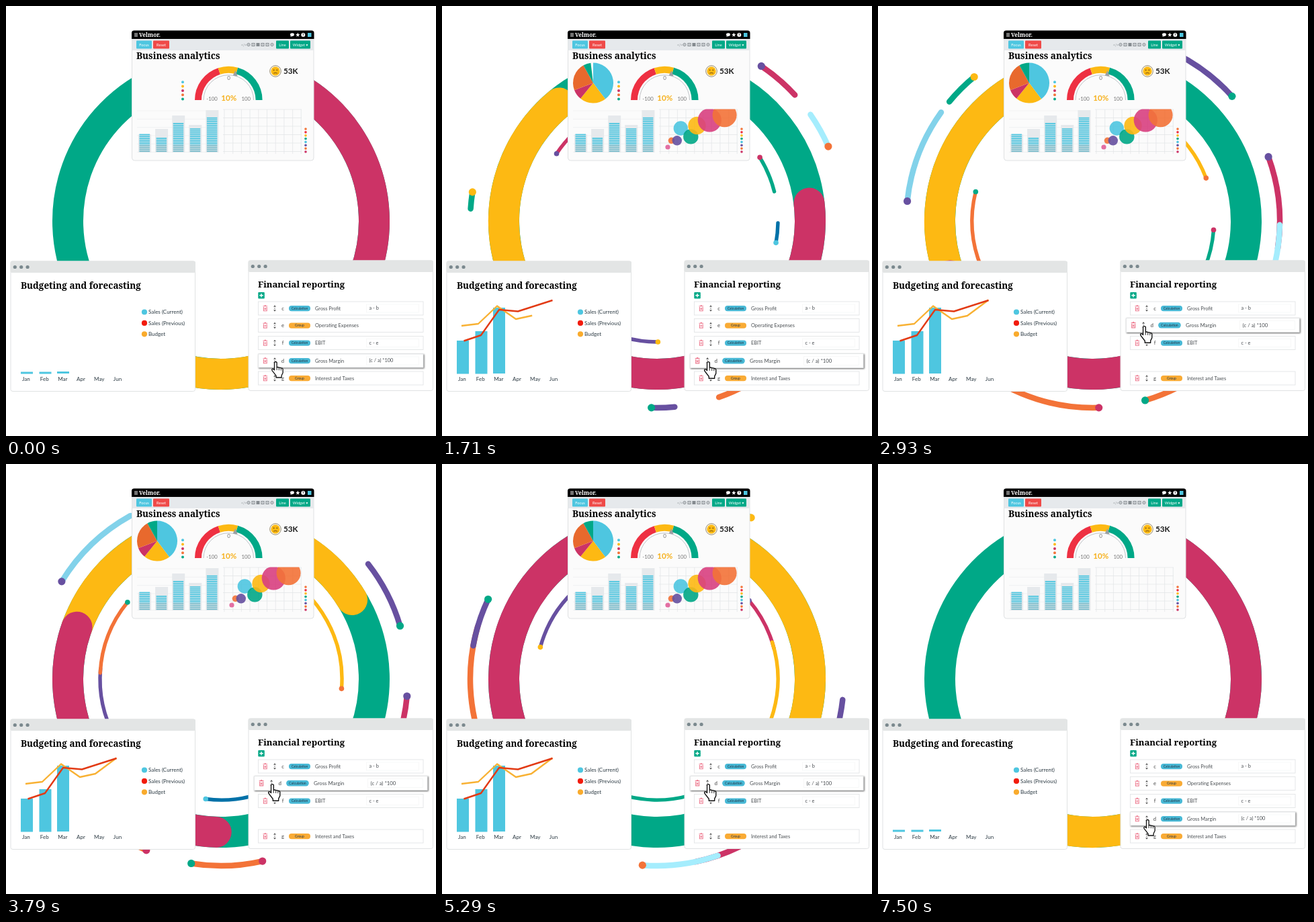
Animation of 640x640 px, one loop 7.57 s. Source, as an HTML page:

```html
<!DOCTYPE html>
<html lang="en">
<head>
<meta charset="utf-8">
<title>Planning cycle</title>
<style>
html, body { margin: 0; width: 100%; height: 100%; overflow: hidden; background: #fff; }
svg { display: block; width: 640px; height: 640px; }
text { font-family: Lato, sans-serif; }
.slab { font-family: "Noto Serif", serif; font-weight: 700; }
</style>
</head>
<body>
<svg id="stage" viewBox="0 0 640 640"></svg>
<script>
const LOOP = 7570, FPS = 14, LAST = 105;
const C = {
  green: '#00a887', pink: '#cc3366', yellow: '#fdb913', purple: '#6750a0', orange: '#f37338',
  sky: '#4ec6e0', pale: '#a5edfd', light: '#82d2ea', blue: '#0071a8', red: '#ee3042'
};
const stage = document.getElementById('stage');

// ---- drawing helpers ----
function el(tag, attrs, parent = stage) {
  const node = document.createElementNS('http://www.w3.org/2000/svg', tag);
  for (const k in attrs) node.setAttribute(k, attrs[k]);
  parent.appendChild(node);
  return node;
}
const group = (parent, attrs = {}) => el('g', attrs, parent);
const rect = (p, x, y, width, height, fill, more) => el('rect', { x, y, width, height, fill, ...more }, p);
const dot = (p, cx, cy, r, fill, more) => el('circle', { cx, cy, r, fill, ...more }, p);
const path = (p, d, stroke, width, more) =>
  el('path', { d, fill: 'none', stroke, 'stroke-width': width, ...more }, p);
const shape = (p, d, fill) => el('path', { d, fill }, p);
function label(p, x, y, str, size, fill, more) {
  const node = el('text', { x, y, 'font-size': size, fill, ...more }, p);
  node.textContent = str;
  return node;
}
const MID = { 'text-anchor': 'middle' };
const BOLD = { 'font-weight': 700 };

// angles run clockwise in degrees, 0 at the top
function polar(cx, cy, r, deg) {
  const a = deg * Math.PI / 180;
  return [cx + r * Math.sin(a), cy - r * Math.cos(a)];
}
function arc(cx, cy, r, a, b) {
  const big = b - a > 180 ? 1 : 0;
  return `M${polar(cx, cy, r, a)}A${r} ${r} 0 ${big} 1 ${polar(cx, cy, r, b)}`;
}
const ramp = (t, from, to) => Math.min(1, Math.max(0, (t - from) / (to - from)));
const ease = u => (1 - Math.cos(Math.PI * u)) / 2;

// ---- ring: yellow over green, pink over both ----
const ring = group(stage);
dot(ring, 320, 320, 228, 'none', { stroke: C.green, 'stroke-width': 46 });
path(ring, arc(320, 320, 228, 0, 129), C.yellow, 46, { 'stroke-linecap': 'round' });
path(ring, arc(320, 320, 228, -108, 0), C.pink, 46, { 'stroke-linecap': 'round' });

// ---- orbiting strokes: radius, tail angle at 3790 ms, length, colour, tail dot, head dot, delay ----
const orbits = [
  [278, 95.4, 28.5, C.pink, C.purple],
  [278, 116.7, 23.5, C.pale, null, C.orange],
  [278, 335.2, 10.8, C.green, null, C.yellow],
  [278, 203.7, 38.5, C.orange, C.pink],
  [278, 236, 15, C.purple, null, C.green],
  [278, 301.6, 29.5, C.light, C.purple],
  [278, 52.1, 21.5, C.purple, null, C.green],
  [278, 167.3, 22, C.orange, C.pink, C.green],
  [180, 5.3, 26, C.pink, C.purple],
  [180, 119.7, 37, C.green, C.pink],
  [180, 152.4, 35, C.blue, null, C.sky, 250],
  [180, 241, 34, C.purple, C.yellow],
  [180, 273, 36.5, C.orange, null, C.green],
  [180, 28, 66.7, C.yellow, null, C.orange]
].map(([r, at, len, color, tail, head, delay = 0]) => {
  const g = group(stage);
  const outer = r > 200;
  return {
    g, r, at, len, delay, size: outer ? 5.6 : 3.8,
    line: path(g, '', color, outer ? 8.5 : 5.4, { 'stroke-linecap': 'round' }),
    tail: tail && dot(g, 0, 0, 1, tail),
    head: head && dot(g, 0, 0, 1, head)
  };
});

function placeDot(node, r, deg, size) {
  if (!node) return;
  const [x, y] = polar(320, 320, r, deg);
  node.setAttribute('cx', x);
  node.setAttribute('cy', y);
  node.setAttribute('r', size);
}
function drawOrbit(o, t) {
  const grow = ease(ramp(t, 840 + o.delay, 2640 + o.delay));
  const shrink = ease(ramp(t, 5785, 7130));
  const shown = grow > 0 && shrink < 1;
  o.g.setAttribute('visibility', shown ? 'visible' : 'hidden');
  if (!shown) return;
  const base = o.at + (t - 3790) * 0.0296;
  const a = base + o.len * shrink, b = base + o.len * grow;
  const size = o.size * Math.min(1, grow * 12, (1 - shrink) * 12);
  o.line.setAttribute('d', arc(320, 320, o.r, a, b));
  placeDot(o.tail, o.r, a, size);
  placeDot(o.head, o.r, b, size);
}

// ---- analytics window ----
const top1 = group(stage);
rect(top1, 187.5, 37, 270.5, 193, '#fbfbfb', { rx: 4, stroke: '#dfe1e3' });
shape(top1, 'M187 49V40q0-3.5 3.5-3.5H455q3.5 0 3.5 3.5V49z', '#000');
rect(top1, 187.5, 49, 270.5, 17, '#e6e9ec');
path(top1, 'M191 41h5M191 43h5M191 45h5', '#fff', 0.9);
label(top1, 198, 46.2, 'Velmor.', 8.3, '#fff', { class: 'slab' });
el('ellipse', { cx: 426, cy: 42.6, rx: 3, ry: 2.3, fill: '#fff' }, top1);
shape(top1, 'M424 43l-.5 3 3-1.6z', '#fff');
const star = Array.from({ length: 10 }, (_, i) => polar(434.3, 43, i % 2 ? 1.4 : 3.4, i * 36)).join(' ');
el('polygon', { points: star, fill: '#fff' }, top1);
dot(top1, 442.3, 43, 3, '#fff');
label(top1, 442.3, 45, '?', 5.5, '#000', { ...MID, ...BOLD });
rect(top1, 449, 40, 5.5, 6, C.sky);

function button(x, w, str, fill) {
  rect(top1, x, 51.5, w, 12, fill, { rx: 1 });
  label(top1, x + w / 2, 59.6, str, 5.7, '#fff', MID);
}
button(194, 23, 'Focus', C.sky);
button(219, 24, 'Reset', '#ef4a48');
button(402, 19, 'Line', C.green);
button(423, 30, 'Widget ▾', C.green);
label(top1, 350, 59.5, '</>', 5, '#858b90');
for (let i = 0; i < 6; i++) {
  const x = 361 + i * 7;
  const look = { stroke: '#858b90', 'stroke-width': 1 };
  if (i % 5 === 0) dot(top1, x, 57.5, 2.1, 'none', look);
  else rect(top1, x - 2, 55.5, 4, 4, i === 2 ? '#858b90' : 'none', look);
  if (i !== 2) path(top1, `M${x - 1} 57.5h2`, '#858b90', 0.7);
}
label(top1, 194, 79.2, 'Business analytics', 13.5, '#000', { class: 'slab' });

// pie
const slices = [[0, C.sky], [143, C.yellow], [219, C.pink], [249, '#e8692d'], [331, C.green]]
  .map(([from, color], i, all) => ({
    from, to: i < 4 ? all[i + 1][0] : 360, node: shape(top1, '', color)
  }));
[C.sky, C.yellow, C.pink, C.orange, C.green].forEach((c, i) => dot(top1, 263, 113.3 + i * 6.3, 2, c));

function drawPie(t) {
  const start = 360 * ramp(t, 5595, 7195), end = 360 * ramp(t, 150, 1745);
  for (const s of slices) {
    const a = Math.max(s.from, start), b = Math.min(s.to, end);
    s.node.setAttribute('d', b > a ? `${arc(225, 114.5, 30, a, b)}L225 114.5z` : '');
  }
}

// gauge
[[-90, -18, C.red], [-18, 16, C.yellow], [16, 90, C.green]]
  .forEach(([a, b, c]) => path(top1, arc(331.3, 140, 45.3, a, b), c, 10));
path(top1, arc(331.3, 140, 37.3, -90, 90), '#b9bec2', 0.9);
shape(top1, 'M341.5 96l3.2 8.5-7-1z', '#9a9fa3');
label(top1, 331.5, 110.3, '0', 8, '#777', MID);
label(top1, 306.6, 141, '-100', 7.8, '#777', MID);
label(top1, 357.3, 141, '100', 7.8, '#777', MID);
label(top1, 331.8, 141, '10%', 11.6, '#f6b01c', { ...MID, ...BOLD });

// mood
dot(top1, 401, 97, 8.3, '#fff', { stroke: '#8a7a55', 'stroke-width': 0.9 });
dot(top1, 401, 97, 6.7, C.yellow);
dot(top1, 398.6, 95.3, 0.9, '#6a4a10');
dot(top1, 403.4, 95.3, 0.9, '#6a4a10');
path(top1, 'M398 100.2q3-1.6 6 0', '#6a4a10', 0.9);
label(top1, 413, 101.2, '53K', 11.7, '#1a1a1a', BOLD);

// striped bars
for (let y = 156; y < 220; y += 12.3) path(top1, `M195 ${y}H316`, '#eceeef', 0.7);
[[191, 191], [183, 195], [163, 174], [177, 183], [155, 167]].forEach(([back, front], i) => {
  const x = 197 + i * 25.1;
  rect(top1, x, back, 19, 218 - back, '#e6e9ec');
  for (let y = 217; y > front; y -= 2.75) rect(top1, x + 1.5, y - 1.7, 15.5, 1.8, y > 206 ? '#79bccb' : C.sky);
});

// bubble chart
for (let i = 0; i < 10; i++) path(top1, `M${325 + i * 12.7} 154V220`, '#e1e4e6', 0.7);
for (let i = 0; i < 6; i++) path(top1, `M323 ${154 + i * 12.5}H440`, '#e1e4e6', 0.7);
const clip = el('clipPath', { id: 'plot' });
rect(clip, 322, 153.5, 118, 68, '#000');
const plot = group(top1, { 'clip-path': 'url(#plot)' });
const bubbles = [
  [336, 210, 3.6, '#e0609a'], [341.5, 200.3, 4.8, C.orange], [349.8, 200.3, 7.2, C.purple],
  [355.3, 182, 10.7, C.sky], [370.3, 194.4, 11.2, C.green], [379.5, 178, 13.2, C.yellow],
  [398.3, 170, 17.6, '#d94080'], [420.6, 162.3, 18, C.orange]
].map(([x, y, r, c]) => ({ r, node: dot(plot, x, y, 0, c, { 'fill-opacity': 0.9 }) }));
[C.orange, C.red, C.yellow, C.green, C.sky, C.purple, C.orange, C.pink]
  .forEach((c, i) => dot(top1, 446, 183 + i * 4.85, 1.8, c));

function drawBubbles(t) {
  bubbles.forEach((b, i) => {
    const lag = i * 105;
    const k = ramp(t, 500 + lag, 800 + lag) * (1 - ramp(t, 5840 + lag, 6140 + lag));
    b.node.setAttribute('r', b.r * k);
  });
}

// ---- plain windows ----
function windowBox(x, y) {
  const g = group(stage);
  rect(g, x, y, 274.5, 193.5, '#fff', { rx: 3, stroke: '#e0e2e3' });
  rect(g, x - 0.5, y - 0.5, 275.5, 17.5, '#e3e5e5', { rx: 2.5 });
  for (let i = 0; i < 3; i++) dot(g, x + 6.3 + i * 9.4, y + 8.5, 2.6, '#7b898e');
  return g;
}

// budgeting
const left = windowBox(7, 380);
label(left, 22, 420.8, 'Budgeting and forecasting', 13.5, '#000', { class: 'slab' });
[['Sales (Current)', C.sky], ['Sales (Previous)', '#f21b0c'], ['Budget', '#f9ab2d']].forEach(([str, c], i) => {
  dot(left, 206, 455.5 + i * 16.4, 4.1, c);
  label(left, 212, 458.3 + i * 16.4, str, 8, '#2d3b44');
});
['Jan', 'Feb', 'Mar', 'Apr', 'May', 'Jun'].forEach((m, i) =>
  label(left, 30 + i * 27.2, 558, m, 8.1, '#2d3b44', MID));
const columns = [[22, 498, 547.5], [49.5, 484, 547.5], [76, 449, 547]]
  .map(([x, y, base]) => ({ y, base, node: rect(left, x, y, 18, 0, C.sky) }));
const trend = (d, color) =>
  path(left, d, color, 2.4, { pathLength: 1, 'stroke-linejoin': 'round' });
const budget = trend('M29 476L54 473L82 446.5L110 466L133 461L164.5 437.5', '#f8b133');
const previous = trend('M32.5 498.5L58 490L85 452L113 454.5L164.5 438', '#e23a14');

function trim(node, a, b) {
  node.setAttribute('visibility', b > a ? 'visible' : 'hidden');
  node.setAttribute('stroke-dasharray', `0 ${a} ${Math.max(0, b - a)} 2`);
}
function drawBudget(t) {
  const k = ease(ramp(t, 70, 800)) * (1 - ramp(t, 6390, 7070));
  for (const c of columns) {
    const h = 3 + (c.base - c.y - 3) * k;
    c.node.setAttribute('y', c.base - h);
    c.node.setAttribute('height', h);
  }
  const gone = ramp(t, 6360, 7060);
  trim(budget, gone, ramp(t, 860, 1980));
  trim(previous, gone, ramp(t, 850, 1620));
}

// reporting
const right = windowBox(361, 379);
label(right, 375, 419.3, 'Financial reporting', 13.1, '#000', { class: 'slab' });
rect(right, 375.3, 426, 9.5, 9.5, C.green, { rx: 1 });
path(right, 'M377.3 430.75h5.5M380 428v5.5', '#fff', 1.4);

function row(parent, y, letter, name, formula, raised) {
  const g = group(parent);
  const box = rect(g, 375.5, y - 10, 245.5, 20, '#fff', { stroke: '#e3e5e6', 'stroke-width': 0.9 });
  if (raised) box.style.filter = 'drop-shadow(1.2px 1.8px 0.8px rgba(0,0,0,.6))';
  path(g, `M382.5 ${y - 3.2}h6.6M384.6 ${y - 4.2}h2.4M383.4 ${y - 2}v5.7h4.8v-5.7M384.6 ${y - 0.6}l2.4 2.6m0-2.6l-2.4 2.6`, '#ee7d92', 1.1);
  shape(g, `M400 ${y - 4.8}l1.9 2.6h-3.8zM400 ${y + 4.8}l1.9-2.6h-3.8z`, '#555');
  dot(g, 400, y, 0.7, '#555');
  label(g, 412, y + 2.6, letter, 7.6, '#444', MID);
  const calc = Boolean(formula);
  rect(g, 421, y - 4, 32, 8.2, calc ? '#48b9d6' : '#f9ab35', { rx: 4 });
  label(g, 437, y + 1.9, calc ? 'Calculation' : 'Group', 5, '#234', MID);
  label(g, 460, y + 2.6, name, 7.4, '#4a4f53');
  if (calc) {
    rect(g, 536.5, y - 6, 78, 12, 'none', { stroke: '#f4f5f5', 'stroke-width': 0.7 });
    label(g, 540.5, y + 2.4, formula, 7.4, '#4a4f53');
  }
  return g;
}
row(right, 450, 'c', 'Gross Profit', 'a - b');
row(right, 475.5, 'e', 'Operating Expenses');
row(right, 501.5, 'f', 'EBIT', 'c - e');
row(right, 554, 'g', 'Interest and Taxes');
const dragged = group(right);
row(dragged, 528, 'd', 'Gross Margin', '(c / a) *100', true);
el('path', {
  d: 'M399.5 530.5q1.8-2 3.6 0v7.5q1.8-1.2 3.2.4q1.8-.8 3 .7q2-.6 2.8 1.4v5.5l-2 4v3h-8v-2.6l-4.6-6q-2.8-3-1.2-4.2q1.4-.8 3.2 1.6z',
  fill: '#fff', stroke: '#111', 'stroke-width': 1.3, 'stroke-linejoin': 'round'
}, dragged);
path(dragged, 'M403.1 538v4M406.3 538.6v3.6M409.3 539.4v3', '#111', 0.9);

function drawDragged(t) {
  const back = ease(ramp(t, 6520, 7060));
  const lift = ease(ramp(t, 1250, 1650)) * (1 - back);
  const rise = ease(ramp(t, 1760, 2700)) * (1 - back);
  dragged.setAttribute('transform',
    `translate(498.5 ${528 - 53 * rise}) scale(${1 + 0.05 * lift}) translate(-498.5 -528)`);
}

// ---- clock: the picture advances in steps of 1/14 s ----
const began = performance.now();
function frame() {
  const now = (performance.now() - began) % LOOP;
  const step = Math.min(LAST, Math.floor(now * FPS / 1000 + 0.1));
  const t = step * 1000 / FPS;
  ring.setAttribute('transform', `rotate(${109.8 + 360 * t / LOOP} 320 320)`);
  orbits.forEach(o => drawOrbit(o, t));
  drawPie(t);
  drawBubbles(t);
  drawBudget(t);
  drawDragged(t);
  requestAnimationFrame(frame);
}
frame();
</script>
</body>
</html>
```
